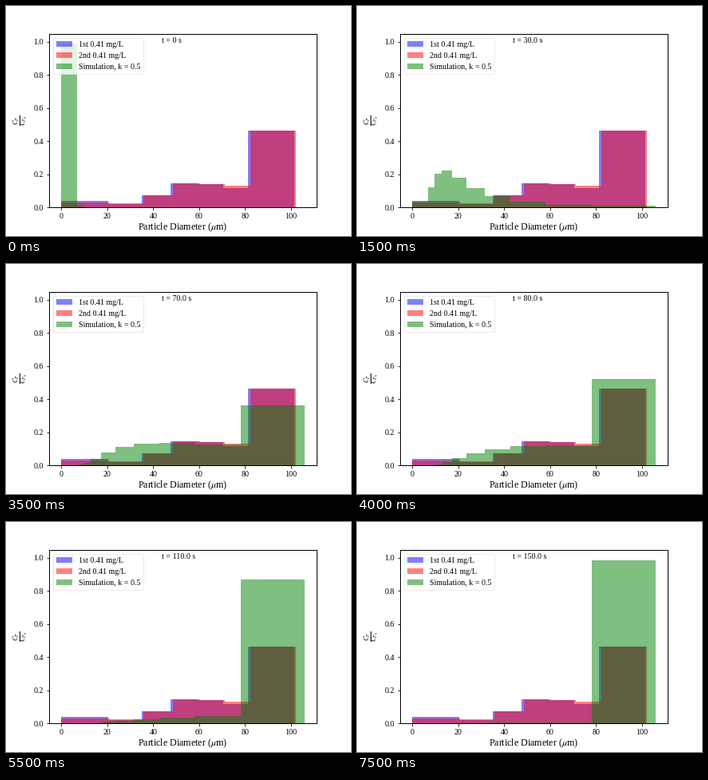
Write a matplotlib script that moves like this. It is 432x288 px and loops after 8000 ms.

```python
import numpy as np
import matplotlib.pyplot as plt
from matplotlib.animation import FuncAnimation

plt.rcParams.update({
    "font.family": "Liberation Serif",
    "mathtext.fontset": "stix",
    "font.size": 10,
    "axes.labelsize": 12,
    "axes.linewidth": 1.0,
    "legend.edgecolor": "0.9",
    "figure.subplot.bottom": 0.125,
})

FRAMES, INTERVAL, STEP = 16, 500, 10.0
T_SEED = 3.2  # age of the nearly uniform starting suspension, s

# Floc size classes: mass doubles per class, fractal dimension 2.3
k = np.arange(9)
edges = np.append(0, 7.02 * 2 ** (np.arange(10) / 2.3))

# Logistic growth: each class boundary is passed at its own level and rate
level = np.array([-.57, .90, 1.67, 2.14, 2.52, 2.88, 3.28, 3.70, 4.12])
rate = 0.056 + 0.037 * np.exp(-(k / 3.3) ** 2)
lag = 0.06 + 0.03 * k ** 2


def fractions(t):
    """Mass fraction in each size class at time t."""
    t = max(t, T_SEED)
    logit = level - rate * t + lag * (30 / t) ** 2
    below = 1 / (1 + np.exp(-logit))
    return np.diff(below, prepend=0, append=1)


def draw_hist(bins, heights, color, label):
    return ax.bar(bins[:-1], heights, np.diff(bins), align="edge",
                  color=color, alpha=0.5, label=label)


fig, ax = plt.subplots(figsize=(6, 4), dpi=72)

draw_hist([0, 20.4, 35, 47.6, 59.5, 70.4, 81.3, 101.3],
          [.040, .021, .074, .146, .140, .116, .465],
          "blue", "1st 0.41 mg/L")
draw_hist([0, 21, 35.6, 48.4, 60.3, 71, 82.1, 102],
          [.030, .022, .073, .145, .141, .131, .465],
          "red", "2nd 0.41 mg/L")
bars = draw_hist(edges, fractions(0), "green", "Simulation, k = 0.5")

ax.set_xlim(-0.05 * edges[-1], 1.05 * edges[-1])
ax.set_ylim(0, 1.05)
ax.set_xlabel(r"Particle Diameter ($\mu$m)", labelpad=1.2)
ax.set_ylabel(r"$\frac{C_P}{C_{P_0}}$")
ax.legend(loc="upper left")
clock = ax.text(0.42, 0.946, "", transform=ax.transAxes)


def update(n):
    t = n * STEP
    for bar, c in zip(bars, fractions(t)):
        bar.set_height(c)
    clock.set_text(f"t = {t:.1f} s" if n else "t = 0 s")
    return [*bars, clock]


anim = FuncAnimation(fig, update, frames=FRAMES, interval=INTERVAL, repeat=True)
plt.show()
```
